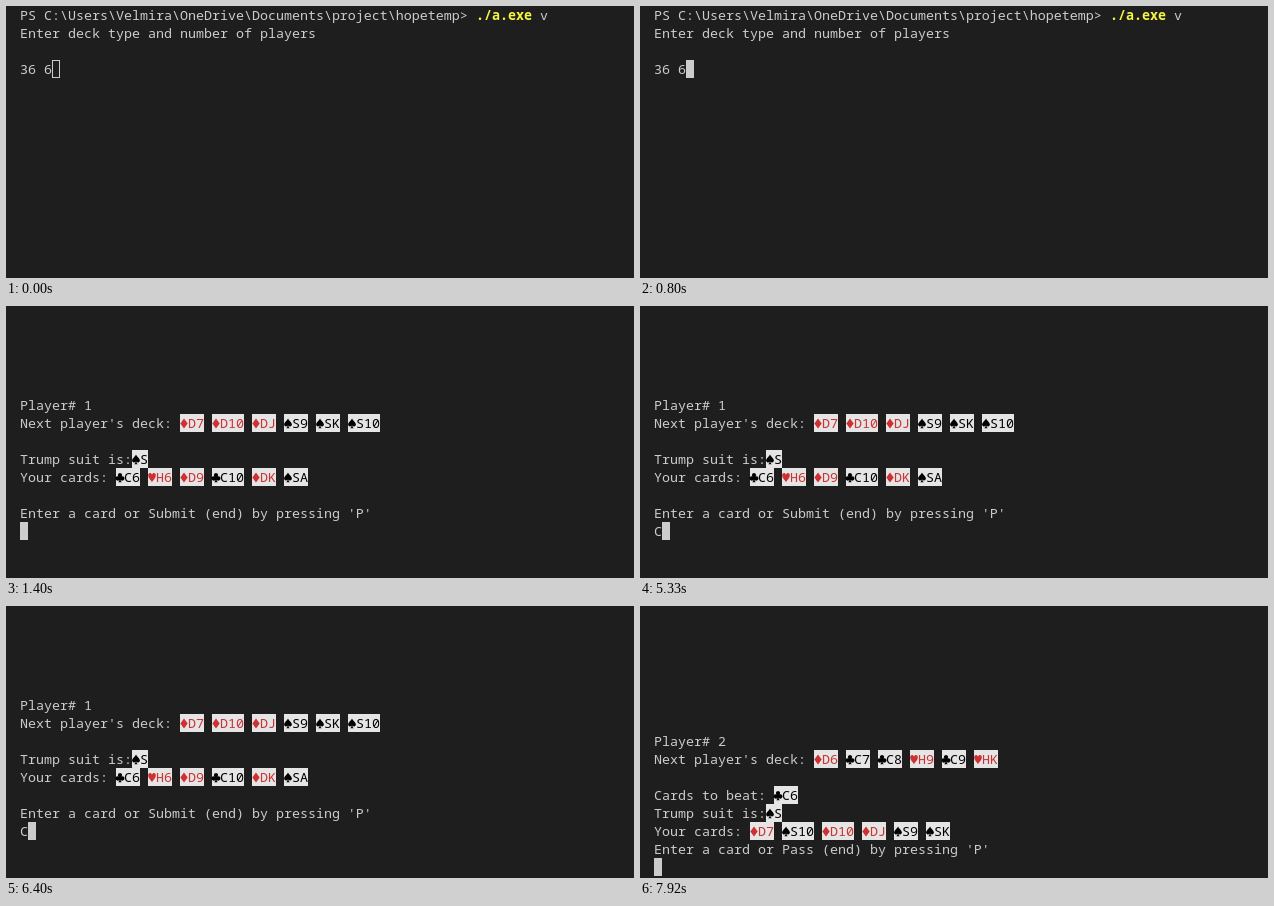
Animation of 628 by 272 pixels, one loop 8 s. Source, as an HTML page:

```html
<!DOCTYPE html>
<html lang="en">
<head>
<meta charset="utf-8">
<title>Card game in a terminal</title>
<style>
  html, body { margin: 0; width: 100%; height: 100%; overflow: hidden; background: #1e1e1e; }
  svg { display: block; }
  text { font: 13.3333px "Noto Sans Mono", "DejaVu Sans Mono", monospace; white-space: pre; fill: #ccc; }
  .command { font-weight: 700; fill: #f5f543; }
  .tile { fill: #e5e5e5; }
  .red { fill: #cd3131; }
  .black { fill: #000; }
  .block { fill: #ccc; }
  .outline { fill: none; stroke: #ccc; }
</style>
</head>
<body>
<svg id="stage" width="628" height="272" viewBox="0 0 628 272"></svg>
<script>
const LEFT = 14, CELL = 8, LINE = 18, BASE = 14, LOOP = 8000;
const colX = col => LEFT + col * CELL;

// Suit shapes inside one 8 x 18 character cell
const SUITS = {
  D: 'M4 4.5 7.7 9.5 4 14.5.3 9.5Z',
  H: 'M4 14.2C3.2 12 .2 10.3.2 7.4.2 4.5 3.2 4.2 4 6.6 4.8 4.2 7.8 4.5 7.8 7.4 7.8 10.3 4.8 12 4 14.2Z',
  S: 'M4 4.4C4.8 6.7 7.9 8.2 7.9 10.6 7.9 12.7 5.3 13 4.5 11.4 4.5 12.8 5 13.6 5.8 14.2H2.2C3 13.6 3.5 12.8 3.5 11.4 2.7 13 .1 12.7.1 10.6.1 8.2 3.2 6.7 4 4.4Z',
  C: 'M2.4 8.5A2.1 2.1 0 1 1 5.6 8.5 2.15 2.15 0 1 1 4.6 11.7Q4.7 13.5 5.8 14.2H2.2Q3.3 13.5 3.4 11.7A2.15 2.15 0 1 1 2.4 8.5Z'
};

const put = (row, col, str, cls = '') =>
  `<text x="${colX(col)}" y="${row * LINE + BASE}" class="${cls}">${str}</text>`;

function card(row, col, name) {
  const ink = 'DH'.includes(name[0]) ? 'red' : 'black';
  const x = colX(col), y = row * LINE;
  return `<rect class="tile" x="${x}" y="${y}" width="${(name.length + 1) * CELL}" height="${LINE}"/>` +
    `<path class="${ink}" transform="translate(${x} ${y})" d="${SUITS[name[0]]}"/>` +
    put(row, col + 1, name, ink);
}

function cards(row, label, names) {
  let col = label.length, out = put(row, 0, label);
  for (const name of names.split(' ')) {
    out += card(row, col, name);
    col += name.length + 2;
  }
  return out;
}

const block = (row, col) =>
  `<rect class="block" x="${colX(col)}" y="${row * LINE}" width="${CELL}" height="${LINE}"/>`;
const outline = (row, col) =>
  `<rect class="outline" x="${colX(col) + .5}" y="${row * LINE + .5}" width="${CELL - 1}" height="${LINE - 1}"/>`;

const path = 'PS C:\\Users\\Velmira\\OneDrive\\Documents\\project\\hopetemp&gt; ';
const pathCols = path.replace('&gt;', '>').length;
const start = put(0, 0, path) + put(0, pathCols, './a.exe', 'command') + put(0, pathCols + 8, 'v') +
  put(1, 0, 'Enter deck type and number of players') + put(3, 0, '36 6');

const firstTurn = put(5, 0, 'Player# 1') +
  cards(6, "Next player's deck: ", 'D7 D10 DJ S9 SK S10') +
  cards(8, 'Trump suit is:', 'S') +
  cards(9, 'Your cards: ', 'C6 H6 D9 C10 DK SA') +
  put(11, 0, "Enter a card or Submit (end) by pressing 'P'");
const typed = str => firstTurn + put(12, 0, str) + block(12, str.length);

const secondTurn = put(7, 0, 'Player# 2') +
  cards(8, "Next player's deck: ", 'D6 C7 C8 H9 C9 HK') +
  cards(10, 'Cards to beat: ', 'C6') +
  cards(11, 'Trump suit is:', 'S') +
  cards(12, 'Your cards: ', 'D7 S10 D10 DJ S9 SK') +
  put(13, 0, "Enter a card or Pass (end) by pressing 'P'") + block(14, 0);

const steps = [
  [0, start + outline(3, 4)],
  [800, start + block(3, 4)],
  [1400, typed('')],
  [5330, typed('C')],
  [7120, typed('C6')],
  [7920, secondTurn]
];

const stage = document.getElementById('stage');
stage.innerHTML = steps.map(([, art]) => `<g display="none">${art}</g>`).join('');
const scenes = [...stage.children];
const origin = performance.now();
let shown = -1;

function draw() {
  const time = (performance.now() - origin) % LOOP;
  const now = steps.findLastIndex(([at]) => at <= time);
  if (now !== shown) {
    scenes.forEach((scene, i) => scene.setAttribute('display', i === now ? 'inline' : 'none'));
    shown = now;
  }
  requestAnimationFrame(draw);
}
draw();
</script>
</body>
</html>
```
